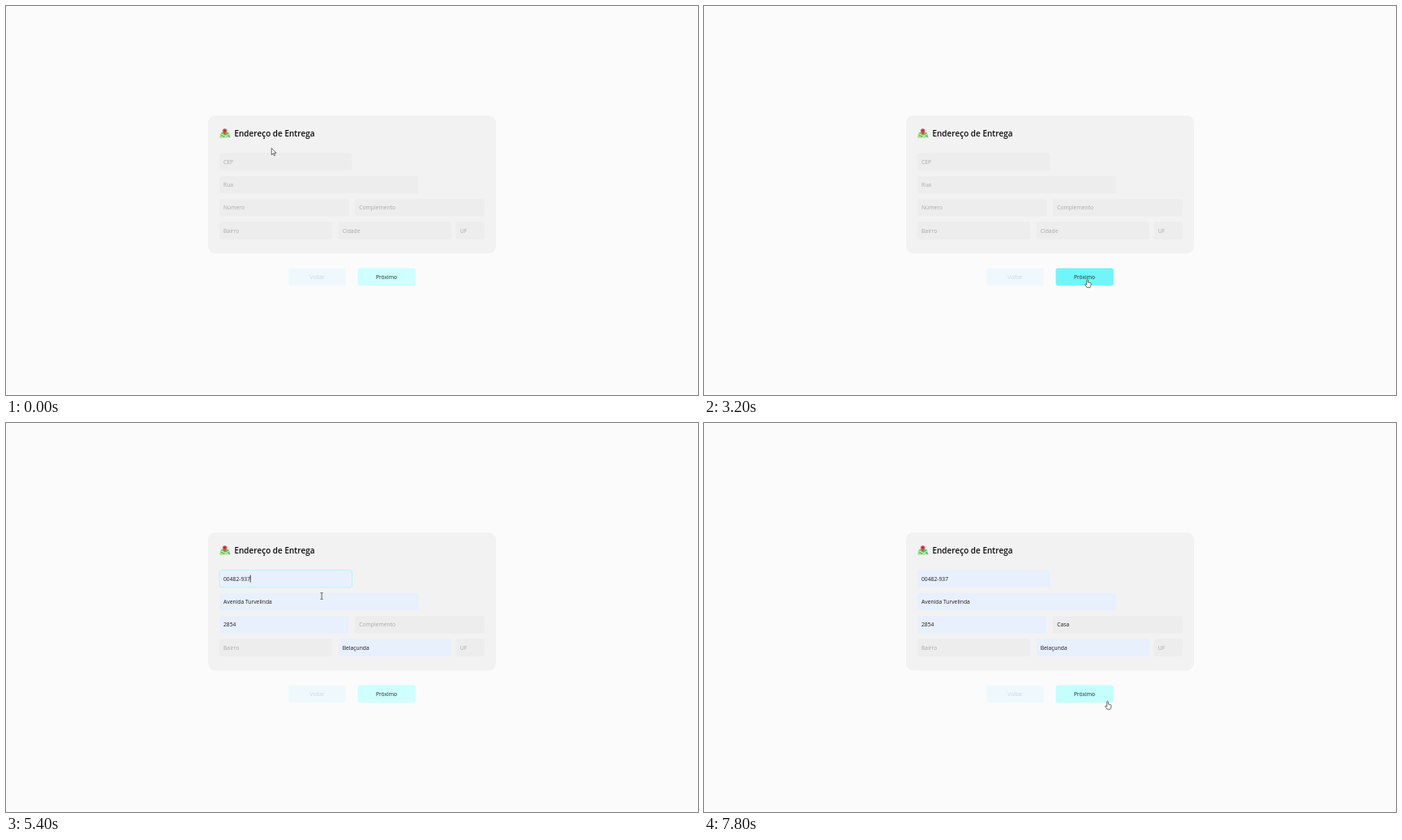
Recreate the animation shown at these times as an HTML page. Size 853x480 px, loop 8 s.

```html
<!DOCTYPE html>
<html lang="pt-BR">
<head>
<meta charset="utf-8">
<title>Endereço de Entrega</title>
<style>
  html, body { margin: 0; width: 100%; height: 100%; overflow: hidden; background: #fbfbfb; }
  svg { display: block; width: 853px; height: 480px; }
  text { font: 6.75px "Open Sans", "Noto Sans", sans-serif; fill: #a9a9ab; }
  .title { font-size: 10px; font-weight: 600; fill: #0c0c0c; }
  .button { text-anchor: middle; }
  .field rect { fill: #ededed; stroke: none; }
  .field.filled rect { fill: #e8f0fe; }
  .field.focus rect { stroke: #a8f4f2; stroke-width: .7; }
  .field.typed text { fill: #1c1c1c; }
</style>
</head>
<body>
<svg viewBox="0 0 853 480">
  <rect width="853" height="480" fill="#fbfbfb"/>
  <rect x="249" y="135" width="355" height="170.5" rx="9" fill="#f2f2f2"/>

  <g id="map-icon">
    <path d="M265 156h9.5l2 6.2h-13z" fill="#55cf62"/>
    <path d="M264 159l5 3.2h-5.5z" fill="#a5e46a"/>
    <path d="M264.5 157.5l10 4.7M269.5 161.6l5.8-4" stroke="#f4f0dc" fill="none"/>
    <path d="M269.7 159.5c-.6-1.8-2.7-3.2-2.7-5.6a2.7 2.7 0 0 1 5.4 0c0 2.4-2.1 3.8-2.7 5.6z" fill="#e34b4b"/>
    <circle cx="269.7" cy="153.9" r="1.1" fill="#8c3038"/>
  </g>
  <text class="title" x="281.4" y="160.8">Endereço de Entrega</text>

  <g id="fields"></g>

  <rect x="348" y="323.6" width="71" height="21.4" rx="2.7" fill="#eff9fd"/>
  <text class="button" x="383.6" y="336.8" style="fill:#ced5da">Voltar</text>
  <rect id="next" x="433.6" y="323.6" width="71.3" height="21.4" rx="2.7"/>
  <text class="button" x="469" y="336.8" style="fill:#202a2a">Próximo</text>

  <path id="caret" stroke="#111" stroke-width=".8"/>

  <g id="cursor" stroke-linejoin="round">
    <path id="arrow" d="M.3.4v8.2l1.9-1.8 1.3 2.9 1.3-.6-1.3-2.8h2.6z" fill="#fff" stroke="#222" stroke-width=".65"/>
    <path id="beam" d="M-1.6-3.9h1.2l.4.4.4-.4h1.2M0-3.5v7M-1.6 3.9h1.2l.4-.4.4.4h1.2" fill="none" stroke="#333" stroke-width=".75"/>
    <path id="hand" d="M-.8.6q.8-1.2 1.6 0v3.1l3 .7q.9.3.8 1.2l-.5 2.7-.7 1.7h-4l-2.2-3.2q-.4-1 .6-1.1l1.4.9z" fill="#fff" stroke="#222" stroke-width=".65"/>
  </g>
</svg>

<script>
const $ = id => document.getElementById(id);
const LOOP = 8000, STEP = 200;
const FILL_AT = 5400, TYPE_AT = 6200, FADE = 300;
const grid = { x: 263, y: 181.4, width: 327, rowHeight: 28.4, fieldHeight: 21.4, gap: 7.4 };

// Field widths are shares of the row.
const half = (1 - grid.gap / grid.width) / 2;
const rows = [
  [{ label: 'CEP', share: .5, value: '00482-937', focus: [4600, 5600] }],
  [{ label: 'Rua', share: .75, value: 'Avenida Turvelinda' }],
  [{ label: 'Número', share: half, value: '2854' },
   { label: 'Complemento', share: half, typing: 'Casa', focus: [5800, 7000] }],
  [{ label: 'Bairro', share: .426 },
   { label: 'Cidade', share: .426, value: 'Belaçunda' },
   { label: 'UF', share: .108 }]
];

// The pointer rests at each stop and eases to the next one.
const stops = [
  { at: 0, x: 327, y: 175 },
  { at: 800, x: 420, y: 250 },
  { at: 1400, x: 200, y: 106 },
  { at: 1800, x: 319.6, y: 368.7 },
  { at: 2400, x: 415, y: 371 },
  { at: 2900, rest: 600, x: 472.6, y: 337.3 },
  { at: 3800, x: 438.4, y: 337.7 },
  { at: 4500, rest: 700, x: 361, y: 198.2 },
  { at: 5800, rest: 700, x: 469.6, y: 257.2 },
  { at: 7200, x: 508, y: 44 },
  { at: 7800, x: 497.5, y: 343.2 }
];

const clamp = v => Math.max(0, Math.min(1, v));
const mix = (a, b, k) => a + (b - a) * k;
const ease = k => k * k * (3 - 2 * k);
const within = (x, y, r) => x >= r.x && x <= r.x + r.w && y >= r.y && y <= r.y + r.h;

function add(parent, tag, attrs) {
  const node = document.createElementNS('http://www.w3.org/2000/svg', tag);
  for (const key in attrs) node.setAttribute(key, attrs[key]);
  return parent.appendChild(node);
}

rows.forEach((row, i) => {
  let left = grid.x;
  for (const f of row) {
    f.w = f.share * grid.width;
    f.h = grid.fieldHeight;
    f.x = Math.min(left, grid.x + grid.width - f.w);
    f.y = grid.y + i * grid.rowHeight;
    left = f.x + f.w + grid.gap;
    f.group = add($('fields'), 'g', {});
    add(f.group, 'rect', { x: f.x, y: f.y, width: f.w, height: f.h, rx: 2.5 });
    f.text = add(f.group, 'text', { x: f.x + 5, y: f.y + 13.2 });
  }
});
const fields = rows.flat();

function pointerAt(t) {
  const next = stops.findIndex(s => s.at > t);
  if (next < 0) return stops[stops.length - 1];
  const from = stops[next - 1], to = stops[next];
  const leave = from.at + (from.rest || 0);
  const k = ease(clamp((t - leave) / (to.at - leave)));
  return { x: mix(from.x, to.x, k), y: mix(from.y, to.y, k) };
}

function drawFields(t) {
  $('caret').style.display = 'none';
  for (const f of fields) {
    const filled = Boolean(f.value) && t >= FILL_AT;
    const count = Math.max(0, Math.floor((t - TYPE_AT) / STEP) + 1);
    const value = filled ? f.value : f.typing ? f.typing.slice(0, count) : '';
    const focused = Boolean(f.focus) && t >= f.focus[0] && t < f.focus[1];
    f.text.textContent = value || f.label;
    f.group.setAttribute('class', 'field' + (filled ? ' filled' : '') +
      (value ? ' typed' : '') + (focused ? ' focus' : ''));
    if (focused) {
      const x = f.x + 5.2 + (value ? f.text.getComputedTextLength() : 0);
      $('caret').setAttribute('d', `M${x} ${f.y + 6.2}v9`);
      $('caret').style.display = '';
    }
  }
}

function drawPointer(t) {
  const { x, y } = pointerAt(t);
  const overNext = within(x, y, { x: 440, y: 323.6, w: 65, h: 21.4 });
  const kind = overNext ? 'hand' : fields.some(f => within(x, y, f)) ? 'beam' : 'arrow';
  for (const id of ['arrow', 'beam', 'hand']) $(id).style.display = id === kind ? '' : 'none';
  $('cursor').setAttribute('transform', `translate(${x} ${y})`);
}

function drawButton(t) {
  const ramp = start => clamp((t - start) / FADE);
  const hover = ramp(2750) - ramp(3500) + ramp(7765);
  $('next').setAttribute('fill',
    `rgb(${mix(207, 112, hover)} ${mix(255, 246, hover)} ${mix(254, 248, hover)})`);
}

function frame() {
  const t = Math.floor(performance.now() % LOOP / STEP) * STEP;
  drawFields(t);
  drawPointer(t);
  drawButton(t);
  requestAnimationFrame(frame);
}
frame();
</script>
</body>
</html>
```
